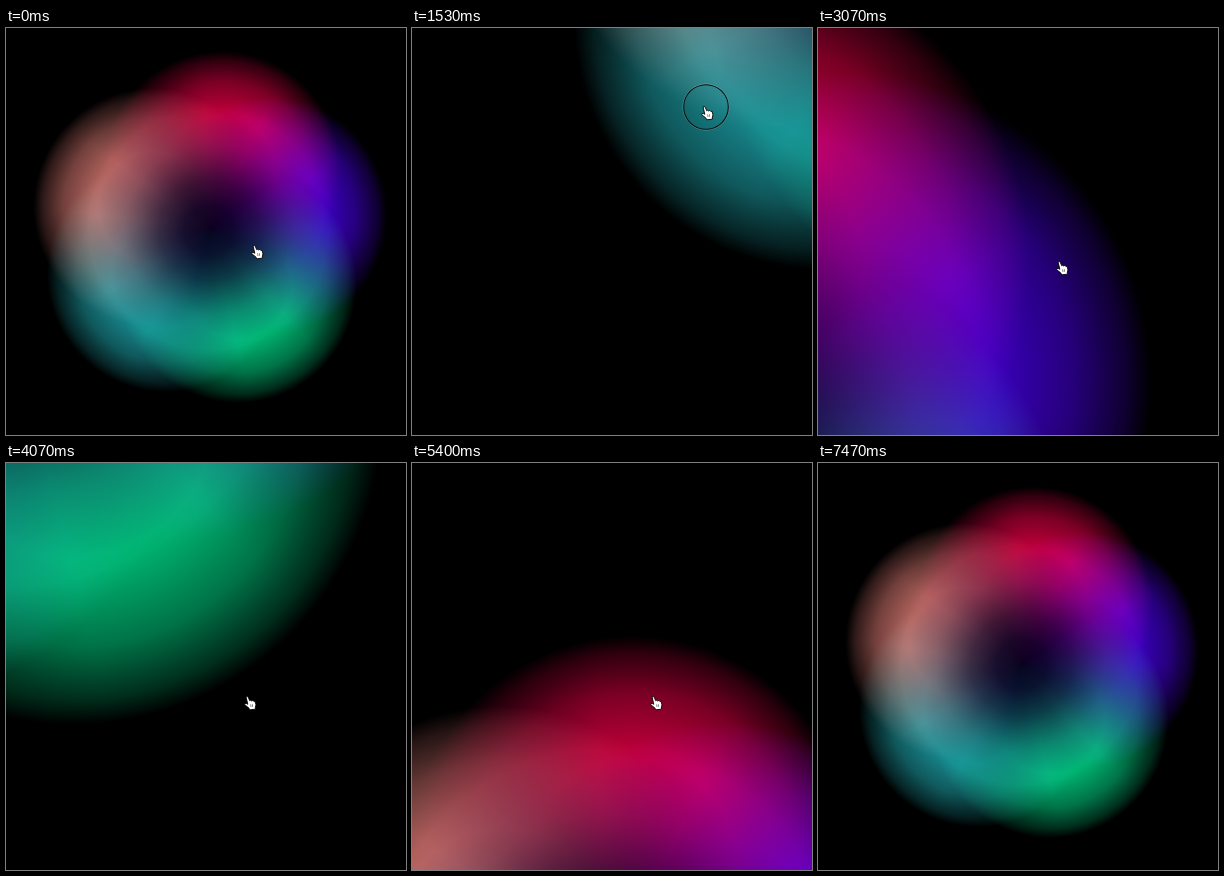
These frames come from a looping animation (400 by 407 pixels, 7540 ms). An HTML page:

```html
<!DOCTYPE html>
<html>
<head>
<meta charset="utf-8">
<style>
  html, body { margin: 0; width: 100%; height: 100%; overflow: hidden; background: #000; }
  #stage { position: absolute; left: 0; top: 0; width: 400px; height: 407px; overflow: hidden; background: #000; }
  #glow, #glow div, #hole { position: absolute; width: 400px; height: 407px; }
  #glow { transform-origin: 0 0; isolation: isolate; }
  #glow .disc { mix-blend-mode: screen; }
  #hole {
    background: radial-gradient(circle 120px at 203px 202px,
      rgba(6,0,28,.97), rgba(8,0,34,.9) 21%, rgba(8,0,34,.7) 42%, rgba(8,0,34,.3) 71%, rgba(8,0,34,0));
  }
  svg { position: absolute; left: 0; top: 0; }
</style>
</head>
<body>
<div id="stage">
  <div id="glow"></div>
  <svg width="400" height="407">
    <g id="cursor">
      <g id="ring" fill="none">
        <circle cx="-1" cy="-6" r="23" stroke="#8fb0b0" stroke-width=".6"/>
        <circle cx="-1" cy="-6" r="22.3" stroke="#0a1012" stroke-width="1.1"/>
      </g>
      <path transform="scale(1.1)" fill="#fff" stroke="#000" stroke-width=".8"
        d="M-3.6-5.6 Q-2.6-6.6-1.7-5.4 L-.2-2 L.6-2.6 L1.6-1.8 L2.6-2.4 L3.5-1.4 L4.6-1.6 L5.4 1.6 L4.8 4.6 L5 5.6 L-.2 6.2 L-1.2 4.4 L-4.8 1.6 Q-5.2.2-3.4.4 L-2 1.2 Z"/>
      <path d="M.6 1.4 L1 4 M2.3 1.2 L2.6 3.8" stroke="#333" stroke-width=".6"/>
    </g>
  </svg>
</div>
<script>
  const LOOP = 7540, CX = 203, CY = 202, OFFSET = 61, RADIUS = 119;
  const $ = id => document.getElementById(id);
  const glow = $('glow'), cursor = $('cursor'), ring = $('ring');

  // Soft discs around a dark middle; each is brightest on the side facing outwards
  function addDisc(angle, color) {
    const x = CX + OFFSET * Math.cos(angle * Math.PI / 180);
    const y = CY + OFFSET * Math.sin(angle * Math.PI / 180);
    const disc = document.createElement('div');
    disc.className = 'disc';
    disc.style.background = `conic-gradient(from ${angle + 90}deg at ${CX}px ${CY}px,
      ${color} 14deg, #000 98deg, #000 262deg, ${color} 346deg)`;
    disc.style.webkitMaskImage = `radial-gradient(circle ${RADIUS}px at ${x}px ${y}px,
      #000 46%, rgba(0,0,0,.62) 75%, rgba(0,0,0,.25) 92%, transparent)`;
    glow.append(disc);
  }
  addDisc(-78, 'rgb(195,0,58)');
  addDisc(-14, 'rgb(60,0,195)');
  addDisc(62, 'rgb(0,185,115)');
  addDisc(135, 'rgb(25,142,148)');
  addDisc(202, 'rgb(185,103,97)');
  const hole = document.createElement('div');
  hole.id = 'hole';
  glow.append(hole);

  const view = [
    { t: 70, x: CX, y: CY, zoom: 1 },
    { t: 835, x: 514, y: 39, zoom: 2 },
    { t: 1530, x: 503, y: -99, zoom: 2.1 },
    { t: 3070, x: -130, y: 391, zoom: 2.6 },
    { t: 4070, x: -8, y: -188, zoom: 2.6 },
    { t: 5400, x: 196, y: 512, zoom: 1.9 },
    { t: 6400, x: 204, y: 266, zoom: 1.19 },
    { t: 7470, x: CX, y: CY, zoom: 1 }
  ];
  const pointer = [
    { t: 70, x: 250, y: 224 },
    { t: 1530, x: 294, y: 85 },
    { t: 2400, x: 243, y: 240 },
    { t: 5400, x: 243, y: 240 },
    { t: 6400, x: 186, y: 196 }
  ];

  // Value of one property: eased between keys, or a smooth curve through them
  function at(keys, time, prop, curved) {
    const last = keys.length - 1;
    const t = Math.min(Math.max(time, keys[0].t), keys[last].t);
    let i = 0;
    while (i < last - 1 && t > keys[i + 1].t) i++;
    const a = keys[i], b = keys[i + 1], span = b.t - a.t, u = (t - a.t) / span;
    const eased = a[prop] + (b[prop] - a[prop]) * u * u * (3 - 2 * u);
    if (!curved) return eased;
    const slope = k => k < 1 || k >= last ? 0 :
      (keys[k + 1][prop] - keys[k - 1][prop]) / (keys[k + 1].t - keys[k - 1].t);
    return eased + span * u * (1 - u) * ((1 - u) * slope(i) - u * slope(i + 1));
  }

  function draw(t) {
    const [x, y, zoom] = ['x', 'y', 'zoom'].map(p => at(view, t, p, true));
    glow.style.transform = `matrix(${zoom},0,0,${zoom},${x - CX * zoom},${y - CY * zoom})`;
    const [px, py] = ['x', 'y'].map(p => at(pointer, t, p, false));
    cursor.setAttribute('transform', `translate(${px + 1} ${py})`);
    cursor.style.display = t < 7270 ? '' : 'none';
    ring.style.display = t > 1200 && t < 1700 ? '' : 'none';
  }

  const start = performance.now();
  function tick() {
    draw((performance.now() - start) % LOOP);
    requestAnimationFrame(tick);
  }
  tick();
</script>
</body>
</html>
```
